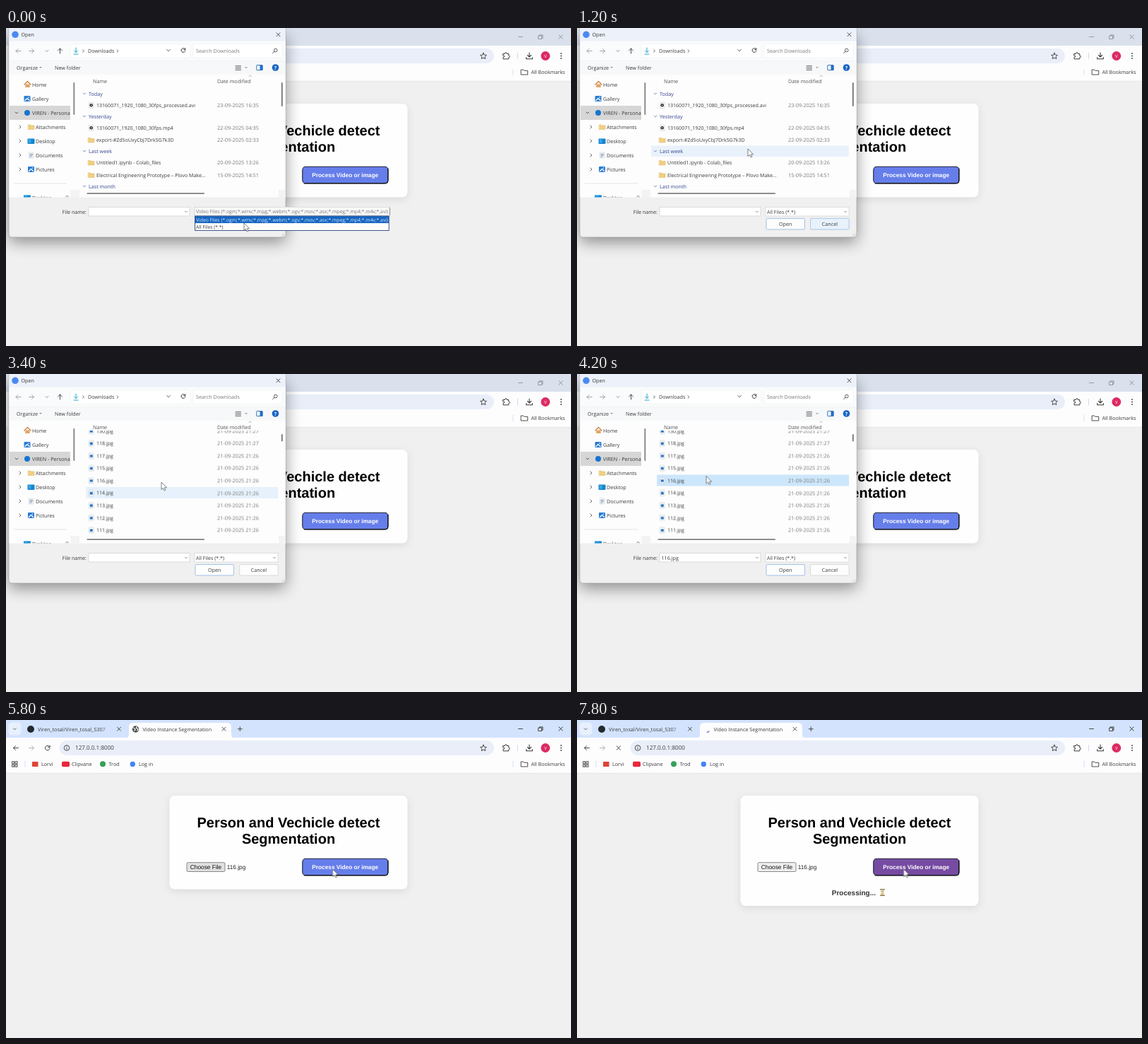
An HTML page for the animation above (8000 ms loop, 800 px wide and 450 px high).

```html
<!DOCTYPE html>
<html lang="en">
<head>
<meta charset="utf-8">
<title>File picker</title>
<style>
  html, body { margin: 0; width: 100%; height: 100%; overflow: hidden; background: #f0f0f0; }
  svg { display: block; width: 800px; height: 450px; }
  text { font-family: "Open Sans", "Noto Sans", sans-serif; text-rendering: geometricPrecision; white-space: pre; }
  .web { font-family: "Liberation Sans", Arial, sans-serif; }
  .bold { font-weight: 700; }
  .mid { text-anchor: middle; }
  .end { text-anchor: end; }
</style>
</head>
<body>
<svg id="stage" viewBox="0 0 800 450" xmlns="http://www.w3.org/2000/svg"></svg>
<script>
const LOOP = 8000;
const INK = '#3a3a3a', GREY = '#7a7a7a', BLUE = '#1f6fd0';

// Drawing helpers; text is placed by its vertical centre.
const text = (x, y, s, size = 7.2, fill = INK, cls = '') =>
  `<text x="${x}" y="${y + size * 0.36}" font-size="${size}" fill="${fill}" class="${cls}">${s}</text>`;
const rect = (x, y, w, h, fill, r = 0, more = '') =>
  `<rect x="${x}" y="${y}" width="${w}" height="${h}" rx="${r}" fill="${fill}" ${more}/>`;
const disc = (x, y, r, fill, more = '') => `<circle cx="${x}" cy="${y}" r="${r}" fill="${fill}" ${more}/>`;
const line = (d, stroke = INK, w = 0.9, more = '') =>
  `<path d="${d}" fill="none" stroke="${stroke}" stroke-width="${w}" stroke-linecap="round" stroke-linejoin="round" ${more}/>`;
const group = (id, body, more = '') => `<g id="${id}" ${more}>${body}</g>`;
const clip = (id, x, y, w, h) => `<clipPath id="${id}">${rect(x, y, w, h, '#000')}</clipPath>`;
const border = (c, w = 0.8) => `stroke="${c}" stroke-width="${w}"`;

const cross = (x, y, r = 2.5, c = INK) => line(`M${x - r} ${y - r}l${2 * r} ${2 * r}m0 ${-2 * r}l${-2 * r} ${2 * r}`, c);
const down = (x, y, r = 2, c = GREY) => line(`M${x - r} ${y - r / 2}l${r} ${r}l${r} ${-r}`, c, 0.8);
const right = (x, y, r = 2, c = GREY) => line(`M${x - r / 2} ${y - r}l${r} ${r}l${-r} ${r}`, c, 0.8);
const arrow = (x, y, turn, c) => line('M-3.5 0h7m-3 -3l3 3l-3 3', c, 0.9, `transform="translate(${x} ${y}) rotate(${turn})"`);
const reload = (x, y, r) => line(`M${x + r * 0.8} ${y - r * 0.6}A${r} ${r} 0 1 0 ${x + r} ${y + 0.5}M${x + r} ${y - r}v${r * 0.7}h${-r * 0.7}`, INK, 1);
const folder = (x, y) =>
  line(`M${x - 4} ${y - 3}h3l1 1h4.5v5.5h-8.500z`, '#d9b25c', 0.5, 'style="fill:#f1cf80"');
const page = (x, y) => rect(x - 3, y - 4, 6.5, 8, '#fbfbfb', 0.6, border('#b5bcc6', 0.5));
const film = (x, y) => page(x, y) + disc(x + 0.2, y, 2.3, '#2c2c2c') + disc(x + 0.2, y, 0.8, '#fff');
const photo = (x, y) => page(x, y) + rect(x - 1.7, y - 1.6, 4, 3.6, '#2873c4', 0.4);
const picture = (x, y) => rect(x - 4.5, y - 4, 9, 8, '#2b7cd3', 1) + line(`M${x - 3} ${y + 2.5}l3 -3l3 3`, '#fff', 1.2) + disc(x + 2, y - 2, 0.8, '#fff');
const screen = (x, y) => rect(x - 5, y - 3.500, 10, 7.5, '#1685cf', 1) + rect(x - 4, y - 2.5, 4, 5, '#35a9e8');

function page_() {
  const card = h => rect(231.5, 107, 337, h, '#fefefe', 7.5, 'style="filter:drop-shadow(0 3px 6px rgba(0,0,0,.09))"');
  return rect(0, 75, 800, 375, '#f0f0f0') +
    group('cardShort', card(132.5)) + group('cardTall', card(156)) +
    text(400, 144.3, 'Person and Vechicle detect', 20, '#000', 'web bold mid') +
    text(400, 167.3, 'Segmentation', 20, '#000', 'web bold mid') +
    rect(256, 201.7, 54, 12.8, '#e1e1e1', 1.5, 'id="choose" ' + border('#6c6c6c')) +
    text(283, 208, 'Choose File', 8.35, '#111', 'web mid') +
    group('noFile', text(312.8, 208, 'No file chosen', 8.25, '#222', 'web')) +
    group('hasFile', text(312.8, 208, '116.jpg', 8.25, '#222', 'web')) +
    rect(419.8, 196.2, 121, 23.6, '#667eea', 4.5, 'id="go" ' + border('#1c1f33', 1.1)) +
    line('M422 220H537.500Q541 220 541 216V199', '#000', 1) +
    text(480.2, 208, 'Process Video or image', 8.3, '#fff', 'web bold mid') +
    group('busy', text(360.800, 244, 'Processing...', 10, '#333', 'web bold') +
      line('M429.500 239.500h6m-6 9h6', '#8a6a4a', 1.2) +
      line('M430 240.300h5q0 2.500 -2 3.700q2 1.200 2 3.700h-5q0 -2.500 2 -3.700q-2 -1.200 -2 -3.700z', '#a9a9a0', 0.6, 'style="fill:#e3dfc8"') +
      line('M431 242h3l-1.500 1.500zM430.800 247.300h3.400l-1.700 -1.500z', '#d9a93c', 0.6, 'style="fill:#e6b94d"'));
}

function controls(c) {
  return line('M725.500 12.500h6', c, 0.8) +
    line('M754 11h4.500v4.500h-4.500zM755.500 11v-1.200h4.500v4.500h-1.300', c, 0.8) + cross(785.5, 12.5, 2.6, c);
}

function browser() {
  const grid = [0, 1, 2, 3].map(i =>
    rect(8.6 + (i % 2) * 4.4, 58.8 + (i >> 1) * 4.4, 3, 3, 'none', 0, border(INK, 0.9))).join('');
  return rect(0, 0, 800, 26, '#d3e3fd', 0, 'id="strip"') +
    rect(3.5, 3.5, 18, 18, '#e8f0fe', 5) + down(12.3, 12.8, 2, INK) +
    disc(35, 13, 5, '#24292f') +
    `<g clip-path="url(#tabClip)"><text x="45" y="15.600" font-size="7.2" fill="url(#tabFade)">Viren_tosal/Viren_tosal_5307</text></g>` +
    cross(160, 12.7) +
    `<path d="M169 25.500q5 0 5 -5V10q0 -6 6 -6H313q6 0 6 6V20.500q0 5 5 5z" fill="#fdfdfe"/>` +
    group('globe', disc(183.5, 13, 4.7, '#4a4d52') +
      line('M180 11l2.500 1l.5 2.500l-1.500 .5M185 9.500l-.5 2l2.500 1.500l-1 2', '#fff', 1.2)) +
    group('spinner', line('M4.480 -1.420A4.700 4.700 0 0 1 4.480 1.420', '#4b5f9a', 1.3)) +
    text(193.5, 13, 'Video Instance Segmentation') + cross(308.5, 12.7) +
    line('M328.300 12.700h6m-3 -3v6') +
    group('winOff', controls('#85898f')) + group('winOn', controls('#222')) +
    rect(0, 25, 800, 50, '#fdfdfe') + rect(0, 74.8, 800, 0.7, '#dfe1e5') +
    rect(75.5, 29, 615.5, 21, '#e9eef9', 10.5) +
    arrow(14, 39.5, 180, INK) + arrow(36, 39.5, 0, '#a8abb0') +
    group('reload', reload(58.8, 39.5, 3.3)) + group('stop', cross(58.8, 39.5, 2.8)) +
    disc(86, 39.5, 3.8, 'none', border(INK, 0.9)) + line('M86 39.300v2M86 37.500v.1') +
    text(98, 39.5, '127.0.0.1:8000', 8.1) +
    line('M676 35.200l1.300 2.900l3.100 .3l-2.300 2.100l.6 3.100l-2.700 -1.600l-2.700 1.600l.6 -3.100l-2.300 -2.100l3.100 -.3z') +
    line('M704 36.500h2.500q0 -2 1.300 -2t1.300 2h2.700v2.700q1.500 0 1.500 1.200t-1.500 1.200v2.200h-7.800v-2.500q1.700 0 1.700 -1.300t-1.700 -1.200z', INK, 1) +
    rect(724, 35, 0.9, 9, '#c9d7ef') +
    line('M741 35v6m-2.700 -2.700l2.700 2.700l2.700 -2.700M736.700 41.500v2.300h8.600v-2.300', INK, 1.1) +
    disc(763.8, 39.5, 6.4, '#dc2a62') + text(763.8, 39.5, 'V', 6, '#fff', 'mid') +
    [36, 39.5, 43].map(y => disc(786, y, 0.9, INK)).join('') +
    grid + rect(26.6, 58, 0.8, 9, '#c9d7ef') +
    rect(37, 59, 8.5, 7, '#df4438', 0.5) + text(50, 62.5, 'Lorvi') +
    rect(79, 58.800, 11, 7.5, '#e8283c', 2) + text(93, 62.5, 'Clipvane') +
    disc(137, 62.3, 4, '#35a058') + text(145.5, 62.5, 'Trod') +
    disc(179.3, 62.5, 3.7, '#4285f4') + text(188, 62.5, 'Log in') +
    rect(717.6, 58, 0.8, 9, '#c9d7ef') +
    line('M729.500 59h3l1.200 1.300h5v5.700h-9.200z') + text(743.5, 62.5, 'All Bookmarks');
}

// List rows: a few headed groups, then a long run of pictures.
const PITCH = 17.55, FIRST = 241.3, NOTCH = PITCH * 6;
const head = (y, s) => down(111, y, 1.7, '#5a66ad') + text(117, y, s, 7.2, '#36458f');
const row = (y, icon, name, date) => icon(120.5, y) + text(128, y, name, 7.05) + text(299, y, date, 7.35, GREY);

function rows() {
  const names = Array.from({ length: 22 }, (_, i) => 157 - i)
    .concat(128, 122, 121, 120, 119, 130, 118, 117, 115, 116, 114, 113, 112, 111, 110, 109);
  const late = names.indexOf(118);
  return head(93, 'Today') + row(109.3, film, '13160071_1920_1080_30fps_processed.avi', '23-09-2025 16:35') +
    head(125, 'Yesterday') + row(141.3, film, '13160071_1920_1080_30fps.mp4', '22-09-2025 04:35') +
    row(158.5, folder, 'export-#Zd5oUxyCbJ7DrkSG7k3D', '22-09-2025 02:33') +
    head(174.3, 'Last week') + row(190.5, folder, 'Untitled1.ipynb - Colab_files', '20-09-2025 13:26') +
    row(208, folder, 'Electrical Engineering Prototype – Plovo Make...', '15-09-2025 14:51') +
    head(224, 'Last month') +
    names.map((n, i) => row(FIRST + i * PITCH, photo, n + '.jpg', '21-09-2025 21:' + (i > late ? 26 : 27))).join('');
}

function sidebar() {
  const sub = (y, icon, s) => right(20, y, 2, INK) + icon(35.5, y) + text(42, y, s);
  return `<g clip-path="url(#sideClip)">` + rect(5, 66, 86, 174, '#fdfdfd') +
    line('M26 80l4.500 -4.500l4.500 4.500', '#c8813f', 1.4) + rect(27.3, 79.500, 6.4, 4.500, '#e0a566') + text(37, 80, 'Home') +
    picture(30, 100) + text(37, 100, 'Gallery') +
    rect(5, 110, 86, 20, '#d6d6d6') + down(15, 120, 2, INK) + disc(30, 120, 4, '#1874d0') + text(37, 120, 'VIREN - Personal') +
    sub(140, folder, 'Attachments') + sub(160, screen, 'Desktop') +
    sub(180, (x, y) => page(x, y) + line(`M${x - 1.5} ${y - 1.500}h3.500m-3.500 1.800h3.500m-3.500 1.800h2`, '#5578a8', 0.8), 'Documents') +
    sub(200, picture, 'Pictures') +
    rect(11, 219.6, 75, 0.8, '#dcdcdc') + screen(30, 240) + text(37, 240, 'Desktop') + line('M84 240l2.500 -3l2 2l-3 2.500', GREY) +
    '</g>' + rect(95.3, 77, 2, 46, '#8b8b8b', 1);
}

function dialog() {
  const button = (x, s, stroke, fill) => rect(x, 269.6, 54.5, 15.4, fill, 1.5, border(stroke)) + text(x + 27.2, 277.5, s, 7.2, INK, 'mid');
  const filters = 'ogm wmv mpg webm ogv mov asx mpeg mp4 m4v avi'.split(' ').map(e => '*.' + e).join(';');
  const video = `Video Files (${filters})`, all = 'All Files (*.*)';
  const item = (y, s, on) => rect(268, y, 274, 10.2, on ? '#1565c0' : '#fff') + text(269, y + 5.2, s, on === (s === video) || s === video ? 6.8 : 7.05, on ? '#d9ebff' : INK);
  const menu = on => item(266.2, video, on === 0) + item(276.3, all, on === 1) +
    rect(267.6, 266, 274.6, 20.6, 'none', 0, border('#28417c', 0.9));

  return rect(4, 4, 392, 292, '#000', 4, 'opacity=".42" style="filter:blur(11px)" transform="translate(0 7)"') +
    rect(4, -6, 392, 302, '#f0f0f0', 4, border('#9a9da3', 0.6)) +
    rect(4.3, 0, 391.4, 18.5, '#edf1f9') + rect(4.3, 18.5, 391.4, 28.5, '#fafbfc') +
    rect(4.3, 47, 391.4, 19, '#f7f8f9') + rect(4.3, 46.6, 391.4, 0.5, '#e6e8ea') + rect(4.3, 66, 391.4, 173.5, '#fdfdfd') +
    disc(13, 9.3, 4.8, '#4a8af0') + text(21.5, 9.5, 'Open') + cross(385.5, 9.3) +
    // navigation
    arrow(17.5, 32.5, 180, '#9b9b9b') + arrow(36, 32.5, 0, '#9b9b9b') + down(58, 32.5) + arrow(76.500, 32.5, -90, INK) +
    rect(91, 22.5, 170, 20, '#fff', 2, border('#eceef0', 0.6)) + rect(265, 22.5, 126, 20, '#fff', 2, border('#eceef0', 0.6)) +
    line('M99 28v6.500m-2.500 -2.500l2.500 2.500l2.500 -2.500M96 37h6', '#21a5c9', 1) +
    right(109.5, 32.5, 1.7, INK) + text(116, 32.5, 'Downloads') + right(158, 32.5, 1.7, INK) +
    down(230, 31.7, 2.4, INK) + reload(251, 31.500, 2.9) +
    text(269, 32.7, 'Search Downloads', 7.2, GREY) + disc(381.8, 31.5, 2.3, 'none', border(INK)) + line('M380 33.300l-2.300 2.300') +
    // command bar
    text(15, 56.5, 'Organize', 7.2) + down(49, 55.8, 1, INK) + text(69, 56.5, 'New folder') +
    line('M325 53.500h7.500m-7.500 2h7.500m-7.500 2h7.500m-7.500 2h7.500', '#555', 0.8) + down(340, 56, 1, INK) +
    rect(354.8, 52.6, 8.4, 7, '#fff', 0.5, border('#1f5ea8', 0.9)) + rect(359.5, 52.6, 3.7, 7, BLUE) +
    disc(381.5, 56, 4.8, '#1865c4') + text(381.5, 56, '?', 7, '#fff', 'mid bold') +
    sidebar() + rect(91.5, 229, 12.500, 10.5, '#f3f3f3') + rect(386, 229, 9.7, 10.5, '#f3f3f3') +
    // file list
    line('M344 68.500l1.700 -1.500l1.700 1.500', GREY, 0.6) + text(123, 75, 'Name', 7.2, '#555') + text(299, 75, 'Date modified', 7.2, '#555') +
    group('hotHead', rect(105, 166.5, 280, 15.7, '#e9f2fb')) +
    group('hotRow', rect(113, 160, 272, 16, '#e6f1fb')) +
    group('nextRow', rect(113, 142.5, 272, 16, '#e6f1fb')) +
    group('picked', rect(113, 142.5, 272, 16, '#cce6fb')) +
    `<g clip-path="url(#listClip)">${group('list', rows())}</g>` +
    rect(114.5, 233.3, 166.5, 1.8, '#808080', 0.9) +
    group('thumbTop', rect(389.8, 77, 2, 34, '#7d7d7d', 1)) + group('thumbLow', rect(389.8, 85, 2, 10.5, '#7d7d7d', 1)) +
    // footer
    text(114, 260, 'File name:', 7.2, INK, 'end') + rect(117, 253.4, 143, 12.6, '#fff', 0, border('#cfcfcf', 0.7)) + down(255, 260, 1.6) +
    group('typed', text(119.5, 260, '116.jpg')) +
    rect(267, 253.4, 118, 12.6, '#fff', 0, border('#d3d3d3', 0.7)) + text(269, 260, all, 7.05) + down(380, 260, 1.6) +
    button(268, 'Open', '#8db4e2', '#fdfdfd') + button(330.7, 'Cancel', '#d2d2d2', '#fdfdfd') +
    group('hotCancel', button(330.7, 'Cancel', '#9cc3ea', '#e8f2fc')) +
    group('drop', rect(267, 253.4, 276.5, 12.6, '#f8f8f8', 0, border('#d0d0d0', 0.6)) + rect(543, 254, 0.8, 11, '#777') +
      text(269, 260, video, 6.8, GREY) + group('menuA', menu(0)) + group('menuB', menu(1))) +
    line('M390.500 294l3 -3m-1 3l1 -1', '#b5b5b5', 0.7);
}

const pointer = '<path d="M0 0V10.600L2.500 8.400L4.200 12L5.900 11.200L4.300 7.800H7.600Z" fill="#fff" stroke="#4d4d4d" stroke-width=".7" stroke-linejoin="round"/>';

document.getElementById('stage').innerHTML =
  '<defs>' + clip('listClip', 104, 79.5, 284, 150) + clip('sideClip', 5, 66, 86, 173.5) + clip('tabClip', 45, 4, 103, 18) +
  '<linearGradient id="tabFade" gradientUnits="userSpaceOnUse" x1="134" x2="149"><stop stop-color="#3a3a3a"/><stop offset="1" stop-color="#3a3a3a" stop-opacity=".1"/></linearGradient></defs>' +
  page_() + browser() + group('dialog', dialog()) + group('pointer', pointer);

// Hard-stepped property changes from [time, value] pairs.
function steps(id, prop, table) {
  const keys = table.map(([t, v]) => ({ offset: t / LOOP, [prop]: v, easing: 'steps(1, end)' }));
  keys.push({ offset: 1, [prop]: table[table.length - 1][1] });
  document.getElementById(id).animate(keys, { duration: LOOP, iterations: Infinity });
}
function show(id, from, to = LOOP) {
  const table = [[from, 1]];
  if (from > 0) table.unshift([0, 0]);
  if (to < LOOP) table.push([to, 0]);
  steps(id, 'opacity', table);
}
const move = (x, y) => `translate(${x}px, ${y}px)`;

show('dialog', 0, 4400);
show('drop', 0, 600);
show('menuA', 0, 200);
show('menuB', 200);
show('hotCancel', 600, 1400);
show('hotHead', 1200, 1400);
show('hotRow', 1400, 3600);
show('nextRow', 3600, 3800);
show('picked', 3800);
show('typed', 3800);
show('thumbTop', 0, 1400);
show('thumbLow', 1400);
show('winOff', 0, 4600);
show('winOn', 4600);
show('noFile', 0, 4600);
show('hasFile', 4600);
show('cardShort', 0, 7000);
show('cardTall', 7000);
show('busy', 7000);
show('globe', 0, 7000);
show('spinner', 7000);
show('reload', 0, 7000);
show('stop', 7000);

steps('strip', 'fill', [[0, '#dae1ed'], [4400, '#d3e3fd']]);
steps('choose', 'fill', [[0, '#e1e1e1'], [6600, '#efefef']]);
steps('go', 'fill', [[0, '#667eea'], [6600, '#6e65c6'], [6800, '#764ba2']]);

// Five notches bring picture 128 under the header, a sixth follows.
const depth = FIRST + 22 * PITCH - 98.2;
steps('list', 'transform', [0, 1, 2, 3, 4, 5, 6].map(n =>
  [n ? 1200 + n * 200 : 0, move(0, n > 5 ? -depth - NOTCH : -depth * n / 5)]));

steps('spinner', 'transform', [[0, move(183, 13)]].concat([0, 1, 2, 3, 4].map(n =>
  [7000 + n * 200, `${move(183, 13)} rotate(${55 + (4 - n) * 70}deg)`])));

steps('pointer', 'transform', [
  [0, 337, 276], [1000, 296, 228], [1200, 242, 171], [3400, 220, 153], [3600, 200, 149], [3800, 183, 144.500],
  [4800, 190, 147], [5000, 232, 158], [5200, 330, 184], [5400, 430, 206], [5600, 462.5, 211]
].map(([t, x, y]) => [t, move(x, y)]));
</script>
</body>
</html>
```
